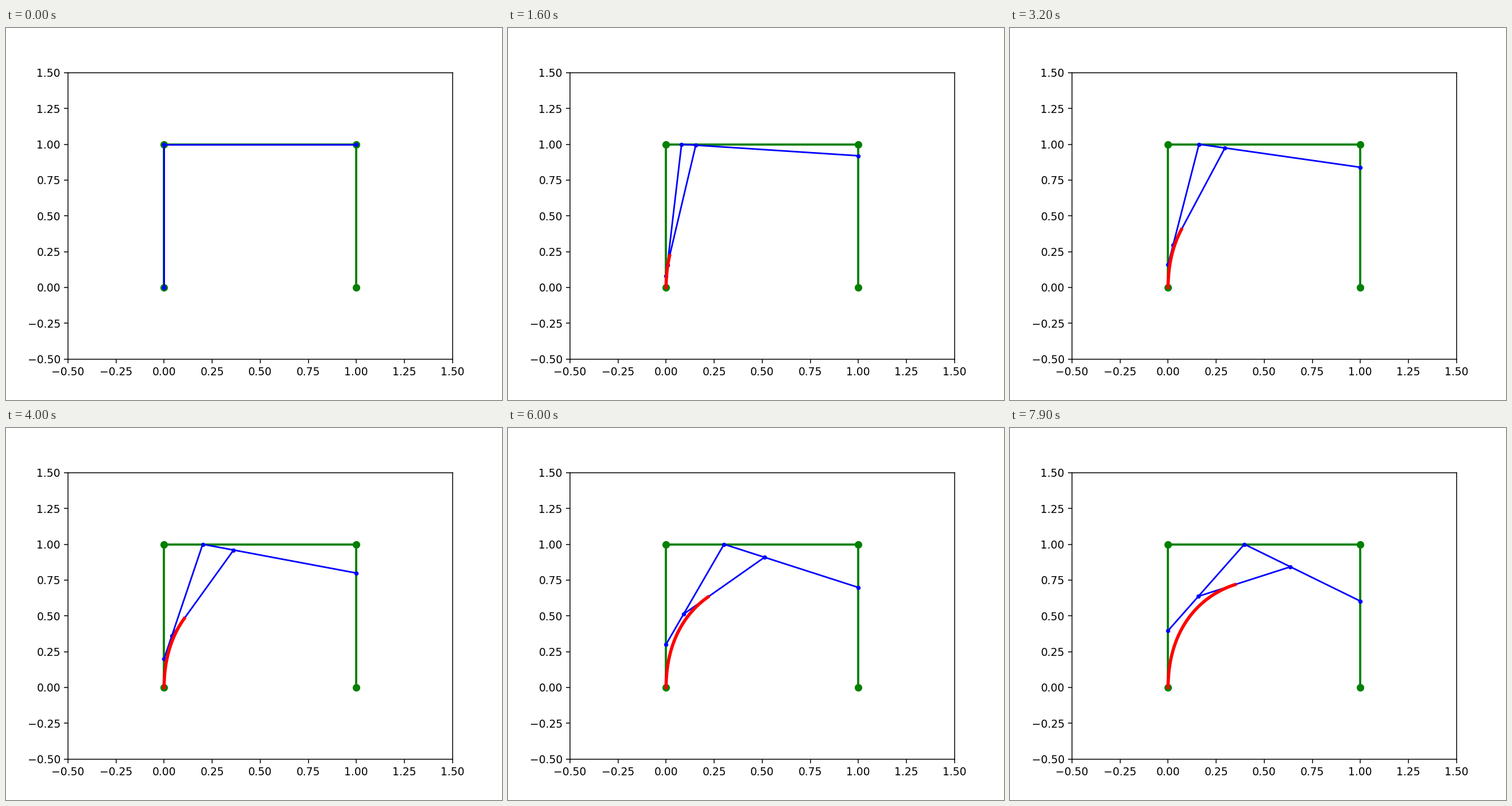
A matplotlib script for the animation above (8 s loop, 864x648 px).

```python
import numpy as np
import matplotlib.pyplot as plt
from matplotlib.animation import FuncAnimation

FRAMES, INTERVAL = 80, 100
STEPS = np.linspace(0, 1, 200)
CONTROL = np.array([[0, 0], [0, 1], [1, 1], [1, 0]], dtype=float)


def reduce_once(points, t):
    """One de Casteljau step: interpolate between neighbouring points."""
    return (1 - t) * points[:-1] + t * points[1:]


def levels(t):
    first = reduce_once(CONTROL, t)
    second = reduce_once(first, t)
    return first, second, reduce_once(second, t)[0]


CURVE = np.array([levels(t)[2] for t in STEPS])

fig, ax = plt.subplots(figsize=(6.4, 4.8), dpi=135)
ax.set_xlim(-0.5, 1.5)
ax.set_ylim(-0.5, 1.5)

ax.plot(*CONTROL.T, "go-", lw=2, ms=6)
first_line, = ax.plot([], [], "bo-", lw=1.5, ms=3)
second_line, = ax.plot([], [], "bo-", lw=1.5, ms=3)
curve_line, = ax.plot([], [], "r-", lw=3)


def update(i):
    first, second, _ = levels(STEPS[i])
    first_line.set_data(*first.T)
    second_line.set_data(*second.T)
    curve_line.set_data(*CURVE[:i + 1].T)
    return first_line, second_line, curve_line


anim = FuncAnimation(fig, update, frames=FRAMES, interval=INTERVAL,
                     repeat=True, repeat_delay=0)
plt.show()
```
